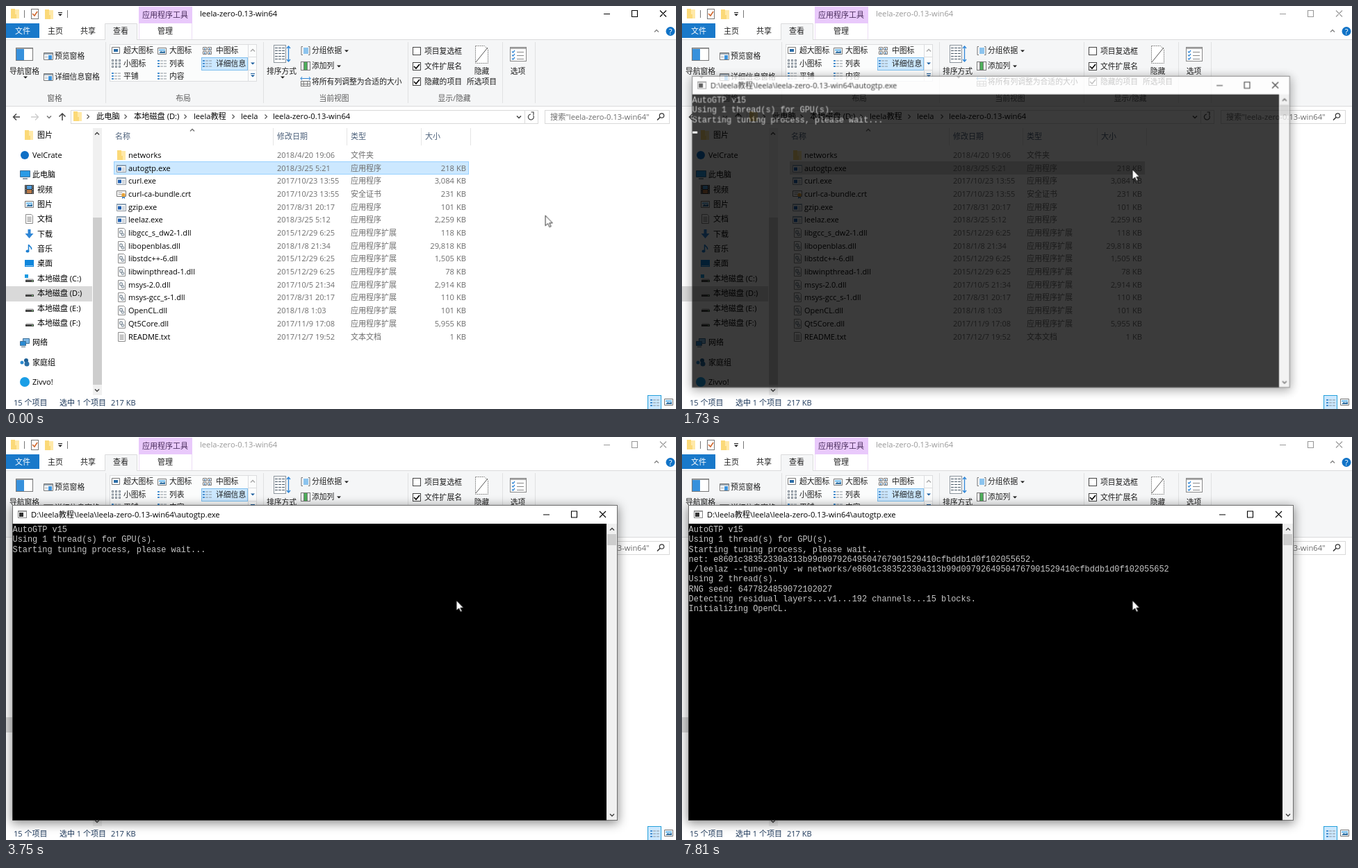
These frames come from a looping animation (964 px wide and 581 px high, 8 s). An HTML page:

```html
<!DOCTYPE html>
<html lang="zh-CN">
<head>
<meta charset="utf-8">
<title>autogtp</title>
<style>
html, body { margin: 0; width: 100%; height: 100%; overflow: hidden; background: #fff; }
#stage { position: relative; width: 964px; height: 581px; overflow: hidden; }
svg { position: absolute; left: 0; top: 0; display: block; }
text { font: 11px "Open Sans", "Noto Sans CJK SC", sans-serif; white-space: pre; }
.rib text { font-size: 10.8px; }
.big text, text.big { font-size: 11.2px; }
.mid { text-anchor: middle; }
.end { text-anchor: end; }

#win { position: absolute; left: 9px; top: 98px; width: 871px; height: 455px;
  box-shadow: 0 3px 14px 1px rgba(0,0,0,.45); }
pre { position: absolute; left: .5px; top: 29.2px; margin: 0; color: #c6c6c6;
  font: 11.88px/14.25px "Liberation Mono", monospace; }
.caret { position: absolute; width: 7px; height: 3px; background: #fff; }

/* 8 s loop: 1% = 80 ms */
.title, .row, #win, .caret, pre span, .ring { animation: 8s step-end infinite; }
.title { color: #000; animation-name: dim; }
.row { fill: #cce8ff; stroke: #99d1ff; animation-name: blur; }
#win { animation-name: open; }
.pointer { animation: move 8s linear infinite; }
.ring { animation-name: click; }
pre .net { animation-name: net; }
pre .seed { animation-name: seed; }
pre .detect { animation-name: detect; }
pre .blocks { animation-name: blocks; }
pre .init { animation-name: init; }
.c1 { left: 1px; top: 81px; animation-name: c1; }
.c2 { left: 343px; top: 138px; animation-name: c2; }
.c3 { left: 1px; top: 152px; animation-name: c3; }

@keyframes dim { 0% { color: #000 } 20.875%, 100% { color: #999 } }
@keyframes blur {
  0% { fill: #cce8ff; stroke: #99d1ff }
  20.875%, 100% { fill: #d9d9d9; stroke: #d9d9d9 }
}
@keyframes open {
  0% { opacity: 0; transform: scale(.95) }
  20.875% { opacity: .3; transform: scale(.962) }
  21.625% { opacity: .77; transform: scale(.988) }
  22.625% { opacity: .96; transform: scale(.998) }
  23.625%, 100% { opacity: 1; transform: none }
}
@keyframes move {
  0% { transform: translate(775.5px, 301.5px) }
  5.125% { transform: translate(775.5px, 301.5px); animation-timing-function: steps(5, start) }
  10% { transform: translate(676px, 253px); animation-timing-function: steps(5, start) }
  14.875%, 100% { transform: translate(647.5px, 235px) }
}
@keyframes click {
  0% { opacity: 0 } 14.875% { opacity: .47 } 15.75% { opacity: 0 }
  16.8125% { opacity: .47 } 17.875%, 100% { opacity: 0 }
}
@keyframes net { 0% { opacity: 0 } 52.75%, 100% { opacity: 1 } }
@keyframes seed { 0% { opacity: 0 } 53.6875%, 100% { opacity: 1 } }
@keyframes detect { 0% { opacity: 0 } 54.625%, 100% { opacity: 1 } }
@keyframes blocks { 0% { opacity: 0 } 69.25%, 100% { opacity: 1 } }
@keyframes init { 0% { opacity: 0 } 97.625%, 100% { opacity: 1 } }
@keyframes c1 { 0% { opacity: 1 } 33.375% { opacity: 0 } 40% { opacity: 1 } 46.875%, 100% { opacity: 0 } }
@keyframes c2 { 0% { opacity: 0 } 66.5% { opacity: 1 } 69.25%, 100% { opacity: 0 } }
@keyframes c3 {
  0% { opacity: 0 } 69.25% { opacity: 1 } 80% { opacity: 0 }
  85.875% { opacity: 1 } 92.75%, 100% { opacity: 0 }
}
</style>
</head>
<body>
<div id="stage">
<svg width="0" height="0"><defs>
  <g id="folder"><path d="M0 0h6v1h6v13H0z" fill="#fbd978"/><path d="M6 1h6v13H8V8H6z" fill="#ffe9a8"/></g>
  <g id="exe"><path d="M.5 2.5h13v10H.5z" fill="#fff" stroke="#8a949e"/><path d="M0 2h14v2H0z" fill="#8fa3b5"/><path d="M2 5.5h5v5H2z" fill="#1f5fb0"/><path d="M8 6.5h4M8 8.5h4M8 10.5h4" stroke="#a9b4be"/></g>
  <g id="crt"><path d="M.5 2.5h13v8H.5z" fill="#fff" stroke="#777"/><path d="M2.5 5h6M2.5 7.5h5" stroke="#999"/><path d="M8 9v5l2-1.5 2 1.5V9z" fill="#3b7fc4"/><circle cx="10" cy="8.5" r="2.7" fill="#e8a33a"/></g>
  <g id="page"><path d="M1.5 .5h8l2 2v11h-10z" fill="#fff" stroke="#8c8c8c"/></g>
  <g id="dll"><use href="#page"/><circle cx="5.5" cy="6" r="2" fill="none" stroke="#8b98a3" stroke-width="1.3"/><circle cx="8" cy="9.5" r="1.7" fill="none" stroke="#8b98a3" stroke-width="1.3"/></g>
  <g id="txt"><use href="#page"/><path d="M3.5 4.5h6M3.5 6.5h6M3.5 8.5h6M3.5 10.5h6" stroke="#8c8c8c"/></g>
  <g id="pc"><path d="M.5 1.5h14v9H.5z" fill="#2a9be6" stroke="#3b6f99"/><path d="M4 13h7" stroke="#5a7387" stroke-width="1.5"/></g>
  <g id="film"><path d="M0 0h13v13H0z" fill="#333"/><path d="M3 1h7v5H3z" fill="#4f9bd9"/><path d="M3 7h7v5H3z" fill="#b97b4a"/><path d="M1.5 1v12M11.5 1v12" stroke="#fff" stroke-dasharray="1 1.5"/></g>
  <g id="photo"><path d="M.5 2.5h12v9H.5z" fill="#fff" stroke="#777"/><path d="M2 4h9v3H2z" fill="#8cc8f0"/><path d="M2 10l3-3 2 1 4-1v3z" fill="#2d6c9e"/></g>
  <g id="down"><path d="M4.5 0h4v6h4L6.500 13 .5 6h4z" fill="#2f86d6"/></g>
  <g id="note"><path d="M5.500 10V1c1 3 5 3 4 7" fill="none" stroke="#1d7fd1" stroke-width="1.5"/><ellipse cx="4" cy="10.5" rx="2.5" ry="2" fill="#1d7fd1"/></g>
  <g id="desk"><path d="M0 2h13v10H0z" fill="#0f86dc"/><path d="M1 10.5h11" stroke="#9bd0f5"/></g>
  <g id="disk"><path d="M2 7h10l1 2H1z" fill="#c9c9c9"/><path d="M1 9h12v3H1z" fill="#444"/><path d="M10 10.5h2" stroke="#8fe08f"/></g>
  <g id="sys"><use href="#disk"/><path d="M0 1h5v5H0z" fill="#1b9ae0"/></g>
  <g id="lan"><path d="M4.5 1.5h9v7h-9z" fill="#7fb9e6" stroke="#3d7099"/><path d="M.5 5.5h8v6h-8z" fill="#2b8cd4" stroke="#3d7099"/><path d="M2 13.5h6" stroke="#5a7387"/></g>
  <g id="home"><circle cx="3" cy="7" r="2.5" fill="#2a8ad0"/><circle cx="9" cy="4" r="3" fill="#1d5f94"/><circle cx="10" cy="9" r="3.5" fill="#2a6fa6"/></g>
  <g id="cloud"><circle cx="7" cy="7" r="6" fill="#0f6fc5"/></g>
  <g id="app"><circle cx="7" cy="7" r="7" fill="#1a9ee6"/></g>
  <g id="pane"><path d="M.5 .5h13v10H.5z" fill="#fff" stroke="#777"/><path d="M1 1h12v2H1z" fill="#9aa7b2"/><path d="M7 4h5v6H7z" fill="#3f94dc"/><path d="M2 5.5h4M2 7.5h4" stroke="#b5bcc2"/></g>
  <g id="thumb"><path d="M.5 1.5h11v9H.5z" fill="#fff" stroke="#777"/><path d="M3 4h6v4H3z" fill="#2c6ea8"/></g>
  <g id="tile"><path d="M.5 .5h5v4h-5z" fill="#fff" stroke="#777"/><path d="M2 2h2v1.500H2z" fill="#2c6ea8"/></g>
  <g id="tiles"><use href="#tile" y="1"/><use href="#tile" x="7" y="1"/><use href="#tile" y="7"/><use href="#tile" x="7" y="7"/></g>
  <g id="grid"><path d="M0 1.5h3M5 1.5h3M10 1.5h3M0 6h3M5 6h3M10 6h3M0 10.5h3M5 10.5h3M10 10.5h3" stroke="#7d8791" stroke-width="3"/><path d="M1 1.5h1M6 1.5h1M11 1.5h1M1 6h1M6 6h1M11 6h1M1 10.5h1M6 10.5h1M11 10.5h1" stroke="#fff"/></g>
  <g id="lines"><path d="M0 2h3M0 6h3M0 10h3" stroke="#4a90cf" stroke-width="2"/><path d="M4 2h4M9 2h4M4 6h4M9 6h4M4 10h4M9 10h4" stroke="#8b949c"/></g>
  <g id="tick"><path d="M0 3l3 3 5-6" fill="none" stroke="#000" stroke-width="1.6"/></g>
</defs></svg>

<svg id="explorer" width="964" height="581"></svg>

<div id="win">
  <svg id="frame" width="871" height="455" viewBox="9 98 871 455"></svg>
  <pre>AutoGTP v15
Using 1 thread(s) for GPU(s).
Starting tuning process, please wait...
<span class="net">net: e8601c38352330a313b99d09792649504767901529410cfbddb1d0f102055652.
./leelaz --tune-only -w networks/e8601c38352330a313b99d09792649504767901529410cfbddb1d0f102055652</span>
<span class="seed">Using 2 thread(s).
RNG seed: 6477824859072102027</span>
<span class="detect">Detecting residual layers...v1...192 channels...</span><span class="blocks">15 blocks.</span>
<span class="init">Initializing OpenCL.</span></pre>
  <i class="caret c1"></i><i class="caret c2"></i><i class="caret c3"></i>
</div>

<svg width="964" height="581">
  <path class="pointer" d="M.6 .6V15.300L4.100 12.100 6.500 17.200 8.700 16.200 6.400 11.300H10.800z" fill="#fff" stroke="#000" stroke-width=".8"/>
  <circle class="ring" cx="647.5" cy="235.5" r="11" fill="#ff0"/>
</svg>
</div>

<script>
const ink = '#1e1e1e';

// y is the vertical middle of the text
const text = (x, y, s, fill = '#000', cls = '') =>
  `<text x="${x}" y="${y + 4}" fill="${fill}" class="${cls}">${s}</text>`;
const rect = (x, y, w, h, fill) => `<rect x="${x}" y="${y}" width="${w}" height="${h}" fill="${fill}"/>`;
const box = (x, y, w, h, fill, stroke) =>
  `<rect x="${x + .5}" y="${y + .5}" width="${w - 1}" height="${h - 1}" fill="${fill}" stroke="${stroke}"/>`;
const line = (d, stroke = '#444', w = 1) => `<path d="${d}" fill="none" stroke="${stroke}" stroke-width="${w}"/>`;
const icon = (id, x, y) => `<use href="#${id}" x="${x}" y="${y}"/>`;
const right = (x, y) => line(`M${x - 1.5} ${y - 3}l3 3-3 3`, '#555', 1.2);
const down = (x, y, c = '#444') => line(`M${x - 3} ${y - 1.5}l3 3 3-3`, c, 1.5);
const up = (x, y, c = '#444') => line(`M${x - 3} ${y + 1.5}l3-3 3 3`, c, 1.5);
const drop = (x, y, c = ink) => `<path d="M${x - 3} ${y - 1.5}h6l-3 3z" fill="${c}"/>`;
const buttons = (x1, x2, x3, y, c) =>
  line(`M${x1} ${y + .5}h9M${x2 + .5} ${y - 4.5}h8v9h-8zM${x3} ${y - 4.5}l9 9m0-9l-9 9`, c, 1.1);

function titleBar() {
  return icon('folder', 7, 4) + line('M26.5 6v11M88.5 6v11', '#777') +
    box(36, 4, 11, 15, '#fff', '#777') + line('M38 11l3 3 4-6', '#d0662c', 1.6) +
    icon('folder', 56, 5) + line('M75 9.5h6', ink) + drop(78, 13) +
    rect(191, 1, 77, 24, '#e9c9fb') + text(229, 13, '应用程序工具', '#4a2d5c', 'mid') +
    `<g class="title">${text(279, 11, 'leela-zero-0.13-win64', 'currentColor', 'big')}` +
    `${buttons(860, 900, 941, 11, 'currentColor')}</g>`;
}

function tabs() {
  return rect(0, 48, 964, 97, '#f5f6f7') + line('M0 48.5H964M0 144.5H964', '#dadbdc') +
    rect(0, 25, 48, 21, '#1979ca') + text(24, 36, '文件', '#fff', 'mid') +
    text(71, 36, '主页', ink, 'mid') + text(118, 36, '共享', ink, 'mid') +
    rect(143, 26, 45, 24, '#f5f6f7') + line('M142.5 48V25.5H188.5V48', '#dadbdc') +
    text(165, 36, '查看', ink, 'mid') + line('M191.5 25V48M267.5 25V48', '#ecdcf5') +
    text(229, 36, '管理', ink, 'mid') + up(936, 36, '#888') +
    '<circle cx="956" cy="36.5" r="6.5" fill="#1173c7"/>' + text(956, 36.5, '?', '#fff', 'mid');
}

function ribbon() {
  let s = [143, 370, 578, 714, 761].map(x => line(`M${x + .5} 52V140`, '#e0e1e2')).join('');
  s += [[70, '窗格'], [255, '布局'], [472, '当前视图'], [645, '显示/隐藏']]
    .map(([x, n]) => text(x, 133, n, '#5c5c5c', 'mid')).join('');

  s += box(14, 60, 25, 19, '#fff', '#777') + rect(15, 62, 11, 16, '#3791dc') + rect(15, 61, 23, 1, '#aaa') +
    text(26.5, 94, '导航窗格', ink, 'mid') + drop(28, 103) +
    icon('pane', 54, 67) + text(70, 72, '预览窗格', ink) +
    icon('pane', 54, 97) + text(70, 102, '详细信息窗格', ink);

  s += box(149, 55, 212, 54, '#fbfcfc', '#dcdddf') + line('M348.5 55V109M349 73.5h12M349 92.5h12', '#dcdddf') +
    box(281, 74, 67, 19, '#cce8ff', '#7fbfee') + up(355, 64, '#aaa') + drop(355, 83, '#1d5f9f') +
    line('M352 97.5h6', '#1d5f9f') + drop(355, 101, '#1d5f9f');
  const views = [['thumb', '超大图标'], ['photo', '大图标'], ['tiles', '中图标'],
    ['grid', '小图标'], ['lines', '列表'], ['lines', '详细信息'], ['lines', '平铺'], ['lines', '内容']];
  views.forEach(([id, n], i) => {
    const col = i % 3, y = 64 + 18.6 * (i / 3 | 0);
    s += icon(id, [152, 218, 283][col], Math.round(y) - 6) + text([169, 235, 302][col], y, n, ink);
  });

  s += box(385, 56, 18, 26, '#fff', '#8b949c') +
    [60, 64, 68, 72, 76].map(y => line(`M387 ${y + .5}h4M392 ${y + .5}h4M397 ${y + .5}h4`, '#4a5a68')).join('') +
    line('M406.5 58V80M404 61l2.5-3 2.5 3M404 77l2.5 3 2.5-3', '#2f86d6', 1.3) +
    text(396.5, 94, '排序方式', ink, 'mid') + drop(398, 103) +
    line('M427 58.5h-2v12h2M435 58.5h2v12h-2', '#777') + rect(428, 60, 7, 9, '#8cc4ee') +
    text(440, 64, '分组依据', ink) + drop(490, 65) +
    box(424, 80, 14, 13, '#fff', '#777') + rect(429, 81, 4, 11, '#4fae5b') + line('M428.5 80v13M433.5 80v13', '#777') +
    text(440, 86, '添加列', ink) + drop(479, 87) +
    box(424, 108, 14, 8, '#fff', '#777') + line('M428.5 108v8M433.5 108v8M424 112.5h14', '#777') +
    line('M424 104.5h14M426 102l-2 2.5 2 2.5M436 102l2 2.5-2 2.5', '#2f86d6') +
    text(440, 109, '将所有列调整为合适的大小', ink);

  [['项目复选框', 59], ['文件扩展名', 81], ['隐藏的项目', 103]].forEach(([n, y], i) => {
    s += box(585, y, 12, 12, '#fff', '#444') + (i ? icon('tick', 587, y + 3) : '') + text(602, y + 5.5, n, ink);
  });
  s += '<path d="M675.5 57.5h13l5 5v20h-18z" fill="#fff" stroke="#888" stroke-dasharray="2 1"/>' +
    line('M676 81L693 60', '#555') + text(684.5, 94, '隐藏', ink, 'mid') + text(684.5, 109, '所选项目', ink, 'mid') +
    box(725, 59, 24, 21, '#fff', '#888') + rect(726, 60, 22, 2, '#aaa') +
    [66, 71, 76].map(y => line(`M728 ${y - .5}l1.5 1.5 2.5-3`, '#2f86d6', 1.2) + line(`M735 ${y}.5h10`, '#888')).join('') +
    text(736.5, 94, '选项', ink, 'mid');
  return `<g class="rib">${s}</g>`;
}

function addressBar() {
  const crumbs = [[130, '此电脑'], [184, '本地磁盘 (D:)'], [270, 'leela教程'], [338, 'leela'], [384, 'leela-zero-0.13-win64']];
  return line('M20 160H11M15 155.5l-4.5 4.5 4.5 4.5', '#444', 1.4) +
    line('M36 160h10M42 155.5l4.5 4.5-4.5 4.5', '#ccc', 1.4) + down(62, 160, '#777') +
    line('M81 165V155M76.5 159.5l4.5-4.5 4.5 4.5', '#444', 1.5) +
    box(93, 150, 673, 20, '#fff', '#d9d9d9') + icon('folder', 97, 152) +
    [118, 172, 258, 327, 374].map(x => right(x, 159.5)).join('') +
    `<g class="big">${crumbs.map(([x, s]) => text(x, 159, s)).join('')}</g>` +
    down(738, 160) + line('M746.5 150v20', '#d9d9d9') +
    line('M758.5 157.5A4 4 0 1 1 755 156M755.5 153h3.5v4', '#444', 1.2) +
    box(775, 150, 180, 20, '#fff', '#d9d9d9') + text(783, 159.5, '搜索"leela-zero-0.13-win64"', '#6d6d6d', 'big') +
    '<circle cx="943.5" cy="158" r="3.2" fill="none" stroke="#333" stroke-width="1.2"/>' + line('M941 160.5l-4 4', '#333', 1.6);
}

function tree() {
  const items = [['folder', '图片', 186, 1], ['cloud', 'VelCrate', 215], ['pc', '此电脑', 243],
    ['film', '视频', 265, 1], ['photo', '图片', 286, 1], ['txt', '文档', 307, 1], ['down', '下载', 329, 1],
    ['note', '音乐', 350, 1], ['desk', '桌面', 371, 1], ['sys', '本地磁盘 (C:)', 393, 1],
    ['disk', '本地磁盘 (D:)', 414, 1], ['disk', '本地磁盘 (E:)', 436, 1], ['disk', '本地磁盘 (F:)', 457, 1],
    ['lan', '网络', 485], ['home', '家庭组', 514], ['app', 'Zivvo!', 542]];
  return rect(0, 404, 124, 22, '#d9d9d9') +
    items.map(([id, n, y, sub]) => icon(id, sub ? 27 : 20, y - 7) + text(sub ? 45 : 38, y, n)).join('') +
    rect(125, 176, 13, 385, '#f0f0f0') + rect(125, 305, 13, 241, '#cdcdcd') + up(131, 184) + down(131, 554);
}

function files() {
  const rows = [['folder', 'networks', '2018/4/20 19:06', '文件夹', ''],
    ['exe', 'autogtp.exe', '2018/3/25 5:21', '应用程序', '218'],
    ['exe', 'curl.exe', '2017/10/23 13:55', '应用程序', '3,084'],
    ['crt', 'curl-ca-bundle.crt', '2017/10/23 13:55', '安全证书', '231'],
    ['exe', 'gzip.exe', '2017/8/31 20:17', '应用程序', '101'],
    ['exe', 'leelaz.exe', '2018/3/25 5:12', '应用程序', '2,259'],
    ['dll', 'libgcc_s_dw2-1.dll', '2015/12/29 6:25', '', '118'],
    ['dll', 'libopenblas.dll', '2018/1/8 21:34', '', '29,818'],
    ['dll', 'libstdc++-6.dll', '2015/12/29 6:25', '', '1,505'],
    ['dll', 'libwinpthread-1.dll', '2015/12/29 6:25', '', '78'],
    ['dll', 'msys-2.0.dll', '2017/10/5 21:34', '', '2,914'],
    ['dll', 'msys-gcc_s-1.dll', '2017/8/31 20:17', '', '110'],
    ['dll', 'OpenCL.dll', '2018/1/8 1:03', '', '101'],
    ['dll', 'Qt5Core.dll', '2017/11/9 17:08', '', '5,955'],
    ['txt', 'README.txt', '2017/12/7 19:52', '文本文档', '1']];
  const gray = '#6d6d6d', head = '#4c607a';
  let s = [[157, '名称'], [390, '修改日期'], [496, '类型'], [603, '大小']].map(([x, n]) => text(x, 188, n, head)).join('') +
    [384, 490, 597, 668].map(x => line(`M${x + .5} 176v25`, '#e5e5e5')).join('') + up(268, 179, '#777') +
    '<rect class="row" x="155.5" y="224.5" width="510" height="18"/>';
  rows.forEach(([id, name, date, kind, size], i) => {
    const y = 215 + 18.68 * i, wide = id === 'exe' || id === 'crt';
    s += icon(id, wide ? 159 : 160, Math.round(y) - 7) + text(176, y, name) +
      text(390, y, date, gray) + text(496, y, kind || '应用程序扩展', gray) +
      (size && text(662, y, size + ' KB', gray, 'end big'));
  });
  return s;
}

function statusBar() {
  const navy = '#1e395b';
  return text(11, 572, '15 个项目', navy) + text(77, 572, '选中 1 个项目', navy) + text(151, 572, '217 KB', navy) +
    box(923, 561, 20, 22, '#cce8ff', '#26a0da') + icon('lines', 927, 566) + icon('photo', 947, 564);
}

function consoleFrame() {
  return rect(9, 98, 871, 455, '#fff') +
    box(17, 106, 13, 11, '#fff', '#888') + rect(19, 109, 6, 6, '#333') + rect(18, 107, 11, 1, '#aaa') +
    text(36, 112, 'D:\\leela教程\\leela\\leela-zero-0.13-win64\\autogtp.exe', '#000', 'big') +
    buttons(773, 813, 854, 111.5, '#000') +
    rect(864, 125, 15, 427, '#f0f0f0') + rect(865, 140, 13, 16, '#cdcdcd') + up(872, 133) + down(872, 545) +
    box(9, 98, 871, 455, 'none', '#6e6e6e') + rect(9.5, 125, 854.5, 427.5, '#000');
}

document.getElementById('explorer').innerHTML =
  titleBar() + tabs() + ribbon() + addressBar() + tree() + files() + statusBar();
document.getElementById('frame').innerHTML = consoleFrame();
</script>
</body>
</html>
```
